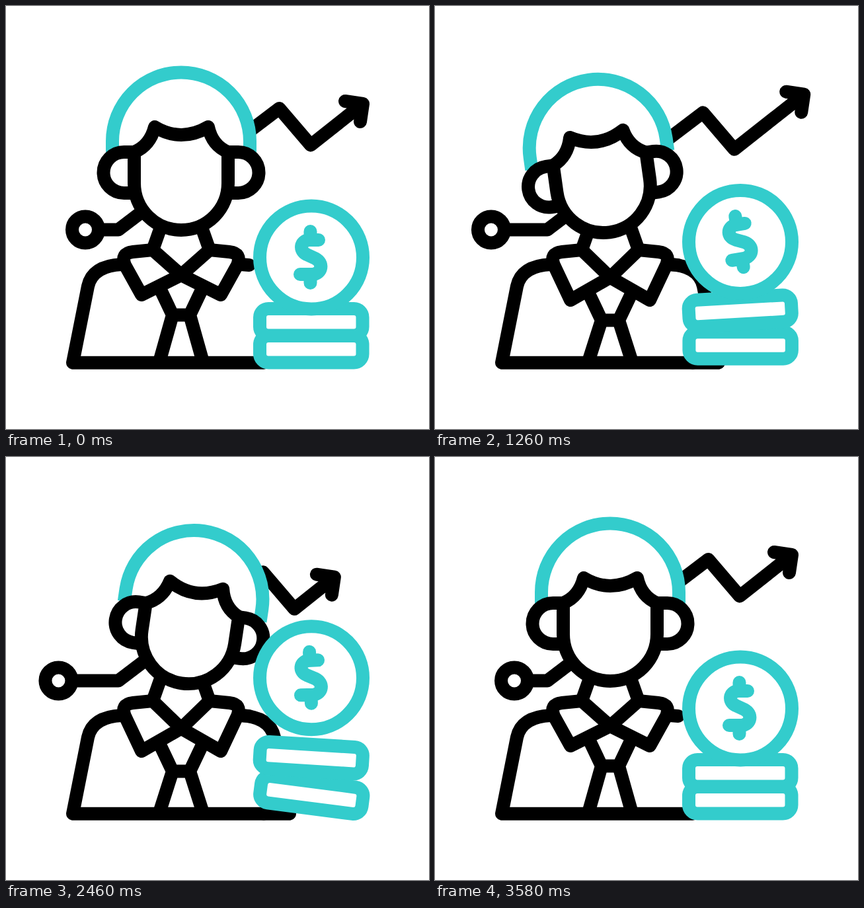
Animation, 640 px wide and 640 px high, one loop 3600 ms. Source, as an HTML page:

```html
<!DOCTYPE html>
<html lang="en">
<head>
<meta charset="utf-8">
<title>Adviser with coins and rising chart</title>
<style>
  html, body { margin: 0; width: 100%; height: 100%; overflow: hidden; background: #fff; }
  svg { display: block; width: 100vw; height: 100vh; }
  path, circle, rect { fill: none; stroke: #000; stroke-width: 20; stroke-linecap: round; stroke-linejoin: round; }
  .teal, .teal * { stroke: #3cc; }
  .solid, .solid * { fill: #fff; }
  #hair { stroke-linecap: butt; }
</style>
</head>
<body>
<svg viewBox="0 0 640 640">
  <path id="arrow"/>
  <path id="wire"/>
  <circle id="mic" class="solid" cy="338.5" r="20"/>

  <path d="M368 392L355 391M175 391Q131 393 124 424L101 539.7H390"/>
  <path id="arm" d="M355 391Q399 393 406 424L429 539.7H390"/>
  <path d="M234 335L222 369M296 335L308 369"/>
  <path id="tie"/>
  <path id="collar"/>

  <g id="head">
    <path id="hair" class="teal solid"/>
    <path id="ears" class="solid"/>
    <path id="face" class="solid"/>
  </g>

  <g class="teal solid">
    <rect id="low" x="384" y="499" width="155.5" height="40.5" rx="13"/>
    <rect id="high" x="384" y="458" width="155.5" height="40.5" rx="13"/>
    <circle id="coin" cx="462" cy="380.5" r="78"/>
  </g>
  <path id="dollar" class="teal" d="M473 354H458C445 356 443 370 455 376L468 382C481 389 478 404 465 406H445M460.5 341V352M460.5 408V419"/>
</svg>
<script>
const LOOP = 3600;
const el = id => document.getElementById(id);
const set = (id, name, value) => el(id).setAttribute(name, value);
const move = (id, x, y, turn = 0, cy = 0) =>
  set(id, 'transform', `translate(${x} ${y}) rotate(${turn} 462 ${cy})`);

const part = (t, from, to) => Math.min(1, Math.max(0, (t - from) / (to - from)));
// Eased step from 0 to 1.
const ramp = (t, from, to) => (1 - Math.cos(Math.PI * part(t, from, to))) / 2;
// Soft rise and fall from 0 through 1 back to 0.
const bump = (t, from, to) => Math.sin(Math.PI * part(t, from, to)) ** 2;

// Lean left, swing right, return; the head nods during each swing.
function drawHead(t) {
  const tilt = -8 * ramp(t, 200, 850) + 16.5 * ramp(t, 1300, 2060) - 8.5 * ramp(t, 2460, 3080);
  const nod = 16 * (bump(t, 200, 850) + bump(t, 1300, 2060) + bump(t, 2460, 3440));
  const sink = ramp(t, 200, 850) - ramp(t, 2900, 3440);
  const crown = 9 * sink + nod, ear = 9.3 * sink + .35 * nod;
  const chin = 3.3 * sink + .15 * nod, drop = 8 * sink + .25 * nod;
  const tuck = .55 * Math.abs(tilt);

  const top = 204.5 + crown, join = 221 + ear, tuft = 183 + crown, jaw = 268 + chin;
  set('head', 'transform', `rotate(${tilt} 265 345)`);
  set('hair', 'd', `M161 ${join + 2}V${top}A104 104 0 0 1 369 ${top}V${join + 2}`);
  set('ears', 'd', `M194 ${join}H${178.5 + tuck}a31 31 0 0 0 0 62H194
    M336 ${join}H${351.5 - tuck}a31 31 0 0 1 0 62H336`);
  set('face', 'd', `M194 ${join}Q218 ${211 + crown} 225 ${tuft}Q265 ${tuft + 24} 306 ${tuft}
    Q312 ${211 + crown} 336 ${join}V${jaw}A71 71 0 0 1 194 ${jaw}Z`);

  const cross = 407 + drop * .45, point = 437 + drop, knot = 467.5 + drop;
  set('collar', 'd', `M222 369L265 ${cross}L205 ${point}L180 392Q173 374 192 372Z
    M308 369L265 ${cross}L325 ${point}L350 392Q357 374 338 372Z`);
  set('tie', 'd', `M233 ${knot - 40}L252 ${knot}H278L297 ${knot - 40}M252 ${knot}L233 535M278 ${knot}L297 535`);
}

// Microphone and chart stretch together, sag once, then fall back.
function drawLines(t) {
  const out = ramp(t, 200, 850), sag = bump(t, 800, 1950);
  const fall = ramp(t, 1900, 2500), home = ramp(t, 2700, 3440);

  const mic = 120 - 47 * (out - .28 * sag - ramp(t, 2150, 3440));
  set('mic', 'cx', mic);
  set('wire', 'd', `M${mic + 20} 338.5H170L222 299`);

  const bend = -9 * sag - 25 * (fall - home);
  const tip = 40 * out - 24 * sag - 84 * fall + 44 * home;
  const at = (x, y, shift) => `${x + shift} ${y - .78 * shift}`;
  set('arrow', 'd', `M${at(345, 207, bend)}L${at(413.5, 155, bend)}L${at(461, 210.5, bend)}
    L${at(540, 148, tip)}m-27-4l27 4l-4 27`);
}

// The coin floats on a fading wave above two hopping slabs.
function drawCoins(t) {
  const wave = Math.cos(2 * Math.PI * (t - 750) / 1150) * Math.max(0, 1 - (t / 2700) ** 2);
  const land = 1 - ramp(t, 3440, 3580);
  const x = 54 * ramp(t, 2900, 3440) * land;
  const y = -(53 + 40 * wave) * ramp(t, 200, 1220) * land;
  move('coin', x, y);
  move('dollar', x, y, 12.5 * wave * ramp(t, 200, 700), 380);
  set('arm', 'visibility', y < -2 ? 'visible' : 'hidden');

  const hop = bump(t, 750, 3080);
  move('high', 0, -42 * hop, hop * (14.5 * ramp(t, 1900, 2460) - 8), 478.5);
  move('low', hop, -14 * hop, 8 * bump(t, 1250, 3300), 519);
}

function frame() {
  const t = performance.now() % LOOP;
  drawHead(t);
  drawLines(t);
  drawCoins(t);
  requestAnimationFrame(frame);
}
frame();
</script>
</body>
</html>
```
